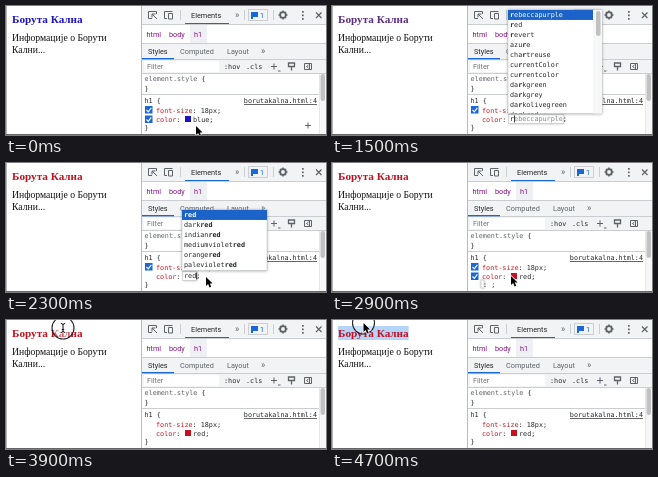
These frames come from a looping animation (320x129 px, 4800 ms). An HTML page with a canvas:

```html
<!DOCTYPE html>
<html lang="sr">
<head>
<meta charset="utf-8">
<style>
html, body { margin: 0; width: 320px; height: 129px; overflow: hidden; background: #fff; }
canvas { display: block; }
</style>
</head>
<body>
<canvas width="320" height="129"></canvas>
<script>
const LOOP = 4800, STEP = 100;
const MONO = '6.75px "DejaVu Sans Mono", monospace';
const UI = '7.3px Roboto, sans-serif';
const UI_BIG = '9px Roboto, sans-serif';
const SERIF = '"Liberation Serif", serif';
const CHAR = 4.064;
const INK = '#27282b', RED = '#c5171f', GREY = '#5f6368', BLUE = '#1a67d8', LINE = '#cacdd1';
const HEADING = 'Борута Кална';
const RE_LIST = ['rebeccapurple', 'red', 'revert', 'azure', 'chartreuse', 'currentColor',
  'currentcolor', 'darkgreen', 'darkgrey', 'darkolivegreen', 'darkred'];
const RED_LIST = ['red', 'darkred', 'indianred', 'mediumvioletred', 'orangered', 'palevioletred'];

// Pointer stops: time, x, y
const PATH = [[0, 190, 120], [500, 199, 113], [2200, 199, 113], [2300, 200, 114], [2500, 179, 113],
  [3100, 179, 113], [3400, 59, 6], [3700, 57, 8], [4300, 57, 8], [4700, 31.5, 3]];

const g = document.querySelector('canvas').getContext('2d');

function rect(x, y, w, h, color) {
  g.fillStyle = color;
  g.fillRect(x, y, w, h);
}

function text(s, x, y, color = INK, font = MONO, align = 'left') {
  g.font = font;
  g.textAlign = align;
  g.fillStyle = color;
  g.fillText(s, x, y);
}

function stroke(d, color = GREY, width = 1) {
  g.strokeStyle = color;
  g.lineWidth = width;
  g.stroke(new Path2D(d));
}

function pill(x, y, w, h, color) {
  g.beginPath();
  g.roundRect(x, y, w, h, w / 2);
  g.fillStyle = color;
  g.fill();
}

function frameBox(x, y, w, h) {
  g.shadowColor = 'rgba(0,0,0,.35)';
  g.shadowBlur = 3;
  rect(x, y, w, h, '#fff');
  g.shadowBlur = 0;
  g.strokeStyle = '#b8babd';
  g.lineWidth = .5;
  g.strokeRect(x, y, w, h);
}

function pointerAt(t) {
  const i = PATH.findIndex(p => p[0] > t);
  if (i < 0) return PATH.at(-1).slice(1);
  const [t0, x0, y0] = PATH[i - 1], [t1, x1, y1] = PATH[i];
  const k = (t - t0) / (t1 - t0);
  return [x0 + (x1 - x0) * k, y0 + (y1 - y0) * k];
}

function stateAt(t) {
  const query = t < 1500 ? '' : t < 1700 ? 'r' : t < 1900 ? 're' : 'red';
  return {
    query,
    editing: t >= 1000 && t < 2400,
    menu: t >= 1500 && t < 2400,
    adding: t >= 2400 && t < 3800,
    hover: t < 3300,
    value: t < 1500 ? 'blue' : t < 1900 ? 'rebeccapurple' : 'red',
    tint: t < 1500 ? '#1c14bd' : t < 1900 ? '#5b2d86' : '#c4101f'
  };
}

function drawPage(t, tint) {
  rect(0, 0, 136, 129, '#fff');
  const font = 'bold 11.2px ' + SERIF;
  g.font = font;
  const end = g.measureText(HEADING).width;
  const word = g.measureText(HEADING.split(' ')[0] + ' ').width;
  if (t >= 4100) {
    const from = t < 4500 ? word : 0;
    rect(6 + from, 6, end - from, 14, '#b4d5fa');
  }
  text(HEADING, 6, 16.5, tint, font);
  text('Информације о Борути', 6, 35, '#111', '9.7px ' + SERIF);
  text('Кални...', 6, 47, '#111', '9.7px ' + SERIF);
}

function drawToolbar() {
  rect(136, 0, 184, 18, '#f1f3f4');
  stroke('M146 12.5H142.5V5.5H150.5V8M146 8L151 13M146 8V11.5M146 8H149.5');
  stroke('M161 12.5H158.5V5.5H166.5M162.5 7.5H166.5V13H162.5Z');
  stroke('M174.5 4V14M238.5 4V14M267.5 4V14', LINE);
  text('Elements', 185, 12, INK, UI);
  rect(179, 17, 44, 1, BLUE);
  text('»', 229, 12, GREY, UI_BIG);
  stroke('M242.5 3.5H261.5V14.5H242.5Z', LINE);
  rect(245, 6, 7, 5, BLUE);
  rect(245, 10, 2, 3, BLUE);
  text('1', 254, 12, BLUE, UI);
  g.beginPath();
  g.arc(277, 9, 2.8, 0, 7);
  g.lineWidth = 1.8;
  g.strokeStyle = GREY;
  g.stroke();
  stroke('M277 4.5V6M277 12V13.5M272.5 9H274M280 9H281.5M274 6L275 7M279 11L280 12M274 12L275 11M279 7L280 6', GREY, 1.5);
  for (const y of [5, 8.5, 12]) rect(296, y, 1.7, 1.7, GREY);
  stroke('M310 6.5L315.5 12M315.5 6.5L310 12', GREY, 1.2);
  rect(136, 18, 184, 1, LINE);
}

function drawTabs() {
  rect(136, 19, 184, 19, '#fff');
  rect(184, 19, 17, 18, '#eef0f3');
  text('html', 140.5, 30.5, '#881280', UI);
  text('body', 163, 30.5, '#881280', UI);
  text('h1', 188, 30.5, '#881280', UI);
  rect(136, 37, 184, 16, '#f1f3f4');
  rect(136, 37, 184, 1, LINE);
  text('Styles', 142, 47.5, INK, UI);
  text('Computed', 174, 47.5, GREY, UI);
  text('Layout', 221, 47.5, GREY, UI);
  text('»', 255, 47.5, GREY, UI_BIG);
  rect(136, 53, 184, 14, '#f1f3f4');
  rect(136, 53, 184, 1, LINE);
  rect(136, 52, 32, 1.3, BLUE);
  rect(138, 55, 75, 11, '#fff');
  text('Filter', 141, 63, '#70757a', UI);
  text(':hov', 218, 62.5);
  text('.cls', 240, 62.5);
  stroke('M265 60.5H271M268 57.5V63.5M272 65H274.5');
  stroke('M282.5 57V60.5H288.5V57ZM285.5 60V64.5', GREY, 1.3);
  stroke('M298.5 57.5H305.5V63.5H298.5ZM303.5 57.5V63.5M302.5 59L300.5 60.5L302.5 62');
  rect(136, 67, 184, 1, LINE);
}

function checkbox(y) {
  rect(139, y, 7.5, 7.5, BLUE);
  stroke(`M140.5 ${y + 4}l1.8 1.8l3 -4`, '#fff', 1.1);
}

function drawStyles(t, s) {
  rect(136, 68, 184, 61, '#fff');
  text('element.style', 138.5, 75, GREY);
  text('{', 138.5 + 14 * CHAR, 75);
  text('}', 138.5, 84.5);
  rect(136, 88, 177, 1, LINE);
  text('h1 {', 138.5, 97);
  text('borutakalna.html:4', 311, 97, INK, MONO, 'right');
  rect(238, 98, 73, .7, INK);

  text('font-size', 150, 106.5, RED);
  text(': 18px;', 150 + 9 * CHAR, 106.5);
  text('color', 150, 115.5, RED);
  text(':', 150 + 5 * CHAR, 115.5);
  if (s.hover) {
    checkbox(100);
    if (!s.editing) checkbox(109.5);
  }
  if (s.editing) drawEditor(s);
  else {
    rect(179, 110, 6, 6, s.tint);
    text(s.value + ';', 187, 115.5);
  }

  if (s.adding) {
    frameBox(149, 117, 3, 8);
    if (t < 2900 || t >= 3000) rect(150, 117.5, .8, 7, '#111');
    text(': ;', 151, 124);
  } else text('}', 138.5, 123.5);
  if (t < 1000) stroke('M299 119.5H305M302 116.5V122.5');

  rect(313, 68, 7, 61, '#f7f7f7');
  rect(313, 68, .6, 61, '#dcdcdc');
  pill(314.5, 68, 4.5, 27, '#c1c1c1');
}

function drawEditor({ value, query }) {
  const x = 178, width = value.length * CHAR;
  frameBox(x - 1.5, 108.5, width + 2.5, 9);
  if (!query) rect(x, 109, width, 8, '#b4d5fa');
  const typed = query || value;
  text(typed, x, 115);
  text(value.slice(typed.length), x + typed.length * CHAR, 115, '#85888c');
  if (query) rect(x + typed.length * CHAR, 109.5, .8, 7, '#111');
  text(';', x + width, 115);
}

function drawMenu({ query }) {
  const long = query !== 'red';
  const list = long ? RE_LIST : RED_LIST;
  const row = 9.95, top = long ? 4 : 47, width = 85, height = 107.5 - top;
  frameBox(176, top, width + (long ? 9 : 0), height);
  if (long) {
    rect(176 + width, top, 9, height, '#f7f7f7');
    pill(264, top + 1, 4.5, 25, '#c1c1c1');
  }
  g.save();
  g.beginPath();
  g.rect(176, top, width, height);
  g.clip();
  rect(176, top, width, row, '#1b62c9');
  list.forEach((name, i) => {
    const y = top + i * row + 7.3, color = i ? INK : '#fff', at = name.indexOf(query);
    const end = at + query.length;
    text(name.slice(0, at), 178, y, color);
    text(query, 178 + at * CHAR, y, color, 'bold ' + MONO);
    text(name.slice(end), 178 + end * CHAR, y, color);
  });
  g.restore();
}

function drawPointer(t) {
  if (t >= 1500 && t < 2300) return;
  const [x, y] = pointerAt(t);
  const arrow = t < 300 || (t >= 2300 && t < 3300) || t >= 4600;
  const pressed = t === 900 || t === 3900 || t >= 4100;
  if (pressed) {
    g.beginPath();
    g.arc(x, y, 11, 0, 7);
    g.fillStyle = 'rgba(255,255,255,.3)';
    g.fill();
    g.strokeStyle = '#222';
    g.lineWidth = 1.1;
    g.stroke();
  }
  g.save();
  g.translate(x, y);
  if (arrow) {
    const shape = new Path2D('M0 0V9L2.1 7.1L3.6 10.4L5.2 9.7L3.8 6.5H6.6Z');
    g.strokeStyle = '#fff';
    g.lineWidth = 1.4;
    g.stroke(shape);
    g.fillStyle = '#000';
    g.fill(shape);
  } else {
    const beam = 'M-2.2 -4.5Q0 -4.5 0 -3Q0 -4.5 2.2 -4.5M0 -3V3M-2.2 4.5Q0 4.5 0 3Q0 4.5 2.2 4.5M-1.2 1.5H1.2';
    stroke(beam, '#fff', 2);
    stroke(beam, '#111', 1);
  }
  g.restore();
}

function draw(t) {
  const s = stateAt(t);
  drawPage(t, s.tint);
  drawToolbar();
  drawTabs();
  drawStyles(t, s);
  rect(135, 0, 1, 129, '#b9bbbe');
  rect(0, 0, 1, 129, '#b5b5b5');
  rect(0, 128, 320, 1, '#666');
  if (s.menu) drawMenu(s);
  drawPointer(t);
}

function tick() {
  draw(Math.floor(performance.now() % LOOP / STEP) * STEP);
  requestAnimationFrame(tick);
}
tick();
</script>
</body>
</html>
```
